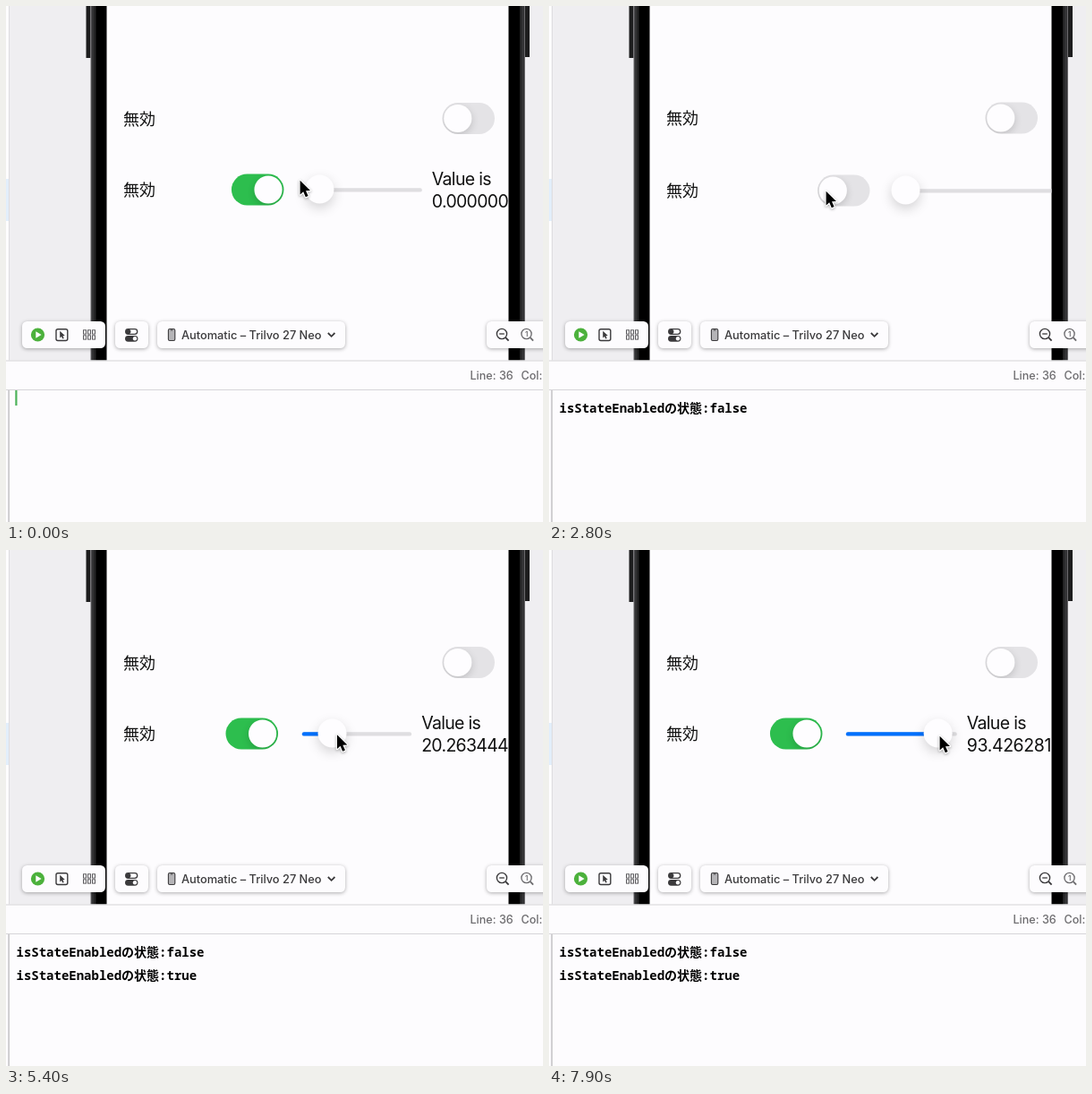
Recreate the animation shown at these times as an HTML page with a canvas. Size 600x576 px, loop 8000 ms.

```html
<!DOCTYPE html>
<html lang="ja">
<head>
<meta charset="utf-8">
<title>Toggle and slider preview</title>
<style>
  html, body { margin: 0; width: 600px; height: 576px; overflow: hidden; background: #fdfcfe; }
  canvas { display: block; }
</style>
</head>
<body>
<canvas id="stage" width="600" height="576"></canvas>
<script>
const ctx = document.getElementById('stage').getContext('2d');
const LOOP = 8000, STEP = 100;
const OFF_AT = 800, ON_AT = 3000, SLIDE = 450;
const SCREEN = '#fdfcfe', GREY = [228, 227, 230], GREEN = [45, 190, 78], BLUE = '#0070fd', INK = '#3b3a3c';
const UI = 'Inter, Roboto, sans-serif';
const CJK = '"Noto Sans CJK JP", "Noto Sans CJK", sans-serif';
const MONO = '"Noto Sans Mono", "Noto Sans CJK JP", "Noto Sans CJK", monospace';

// Each key: time, x, y
const pointer = [
  [0, 328, 194], [100, 324, 194], [200, 324, 194], [700, 282, 209], [1100, 282, 210],
  [1500, 282, 210], [2200, 309, 206], [3100, 309, 206], [3600, 362, 205],
  [3900, 352, 205], [4700, 353, 205], [6200, 388, 206], [7100, 420, 207], [7900, 436, 207]
];
// Each key: time, slider value
const values = [[3800, 0], [4700, 1.305965], [6200, 41.929135], [7100, 71.960783], [7900, 93.426281]];

function at(keys, t, i) {
  if (t <= keys[0][0]) return keys[0][i];
  for (let k = 1; k < keys.length; k++) {
    const a = keys[k - 1], b = keys[k];
    if (t === b[0]) return b[i];
    if (t < b[0]) return a[i] + (b[i] - a[i]) * (t - a[0]) / (b[0] - a[0]);
  }
  return keys[keys.length - 1][i];
}

const easeOut = p => 1 - Math.pow(1 - Math.min(1, Math.max(0, p)), 3);

function box(x, y, w, h, fill) {
  ctx.fillStyle = fill;
  ctx.fillRect(x, y, w, h);
}

function round(x, y, w, h, r) {
  ctx.beginPath();
  ctx.roundRect(x, y, w, h, r);
}

function disc(x, y, r, fill) {
  ctx.fillStyle = fill;
  ctx.beginPath();
  ctx.arc(x, y, r, 0, Math.PI * 2);
  ctx.fill();
}

function path(points, close) {
  ctx.beginPath();
  points.forEach(([x, y]) => ctx.lineTo(x, y));
  if (close) ctx.closePath();
}

function pen(color, width) {
  ctx.strokeStyle = color;
  ctx.lineWidth = width;
}

function label(str, x, y, font, color, spacing = 0) {
  ctx.font = font;
  ctx.letterSpacing = spacing + 'px';
  ctx.fillStyle = color;
  ctx.fillText(str, x, y);
}

function shadowed(alpha, blur, dy, draw) {
  ctx.save();
  ctx.shadowColor = `rgba(0,0,0,${alpha})`;
  ctx.shadowBlur = blur;
  ctx.shadowOffsetY = dy;
  draw();
  ctx.restore();
}

function toggle(x, cy, on) {
  const c = GREY.map((g, i) => Math.round(g + (GREEN[i] - g) * on));
  ctx.save();
  round(x, cy - 17.5, 58.5, 35, 17.5);
  ctx.fillStyle = `rgb(${c})`;
  ctx.fill();
  ctx.clip();
  shadowed(0.16, 8, 3, () => disc(x + 17.3 + 23.8 * on, cy, 15.6, '#fefdff'));
  ctx.restore();
}

function slider(x, end, cy, value) {
  const knob = x + 15 + (end - x - 30) * value / 100;
  round(x, cy - 1.8, end - x, 4.4, 2.2);
  ctx.fillStyle = '#dfdee1';
  ctx.fill();
  if (value > 0) {
    round(x, cy - 1.8, knob - x, 4.4, 2.2);
    ctx.fillStyle = BLUE;
    ctx.fill();
  }
  shadowed(0.17, 13, 5, () => disc(knob, cy - 0.5, 16, '#fefdff'));
}

function phone() {
  box(0, 0, 600, 396, '#efeef1');
  box(0, 0, 3, 396, SCREEN);
  box(0, 193, 3, 47, '#e2eefb');
  box(3, 0, 1, 396, '#dddcdf');
  box(89.5, 0, 5, 58, '#1d1d1e');
  box(580, 0, 5, 57, '#1d1d1e');
  box(94.5, 0, 485.5, 396, '#6a696c');
  box(95.5, 0, 483.5, 396, '#333335');
  box(98, 0, 478, 396, '#242425');
  box(100.5, 0, 473.5, 396, '#000');
  box(112.5, 0, 449, 396, SCREEN);
}

function panel(x, w) {
  round(x, 352, w, 30, 5.5);
  ctx.fillStyle = SCREEN;
  shadowed(0.32, 4, 1, () => ctx.fill());
}

function lens(x, color) {
  pen(color, 1.4);
  ctx.beginPath();
  ctx.arc(x, 366, 5.6, 0, Math.PI * 2);
  ctx.stroke();
  pen(color, 1.9);
  path([[x + 4.2, 370.2], [x + 7.6, 373.6]]);
  ctx.stroke();
}

function toolbar() {
  panel(18, 93);
  panel(122, 37);
  panel(169, 210);
  panel(537, 80);

  disc(35.5, 367, 7.6, '#4cb13c');
  path([[33.3, 363.2], [33.3, 370.8], [39.6, 367]], true);
  ctx.fillStyle = '#fff';
  ctx.fill();

  pen(INK, 1.4);
  round(56, 360.7, 12.8, 12.8, 2);
  ctx.stroke();
  path([[60.2, 362.8], [60.2, 370.4], [62, 368.9], [63.3, 371.6], [64.7, 371], [63.5, 368.3], [65.8, 368.1]], true);
  ctx.fillStyle = INK;
  ctx.fill();

  pen('#5c5b5e', 1);
  for (let i = 0; i < 6; i++) {
    ctx.strokeRect(86.5 + (i % 3) * 5, 361.8 + Math.floor(i / 3) * 6, 3, 4.3);
  }

  pen(INK, 1.3);
  round(133.7, 360.7, 13, 5.6, 2.8);
  ctx.stroke();
  disc(136.6, 363.5, 2.8, INK);
  round(133, 367.9, 14.4, 6.8, 3.4);
  ctx.fillStyle = INK;
  ctx.fill();
  disc(144, 371.3, 2.2, SCREEN);

  round(181.4, 360.5, 7.4, 13, 1.6);
  ctx.fillStyle = '#b5b4b7';
  ctx.fill();
  pen(INK, 1.1);
  ctx.stroke();
  box(183.8, 361.4, 2.6, 1, INK);
  label('Automatic – Trilvo 27 Neo', 196, 371.5, '500 12.8px ' + UI, INK);
  pen(INK, 1.8);
  path([[359.8, 365], [363.6, 368.8], [367.4, 365]]);
  ctx.stroke();

  lens(554, INK);
  pen(INK, 1.3);
  path([[551.2, 366], [556.8, 366]]);
  ctx.stroke();
  lens(581.5, '#6e6d70');
  label('1', 579.9, 369, '600 8px ' + UI, '#6e6d70');
}

function consolePane(t) {
  box(0, 395.5, 600, 181, SCREEN);
  box(0, 395.5, 600, 1, '#d6d5d8');
  box(0, 428, 600, 1, '#d6d5d8');
  box(2.5, 429, 1.2, 147, '#b3b2b5');
  const font = '500 12.6px ' + UI;
  label('Line: 36', 518.5, 416.5, font, '#6d6c6f');
  label('Col:', 575.5, 416.5, font, '#6d6c6f');
  if (t < OFF_AT) box(10.3, 429, 2.2, 17, '#4db35a');
  const log = (state, y) => label('isStateEnabledの状態:' + state, 11.5, y, '600 14px ' + MONO, '#000');
  if (t >= OFF_AT) log('false', 454);
  if (t >= ON_AT) log('true', 480);
}

function controls(t) {
  const enabled = t < OFF_AT || t >= ON_AT;
  const on = t < ON_AT ? 1 - easeOut((t - OFF_AT) / SLIDE) : easeOut((t - ON_AT) / SLIDE);
  const top = enabled ? 125.5 : 125, row = enabled ? 205 : 206;
  const font = '18px ' + CJK;
  label('無効', 131, top + 7, font, '#111');
  label('無効', 131, row + 7, font, '#111');
  toggle(487.5, top, 0);

  ctx.save();
  ctx.beginPath();
  ctx.rect(112.5, 0, 449, 396);
  ctx.clip();
  if (enabled) {
    const value = at(values, t, 1), str = value.toFixed(6);
    const big = '19.5px ' + UI, tight = -0.7;
    // Narrow ones get a little more air
    const loose = tight + 0.3 * (str.split('1').length - 1);
    ctx.font = big;
    ctx.letterSpacing = loose + 'px';
    const x = 561 - ctx.measureText(str).width, shift = x - 476;
    toggle(252 + shift * 0.55, row, on);
    slider(335.5 + shift * 0.4, x - 11, row, value);
    label('Value is', x, 199.5, big, '#111', tight);
    label(str, x, 225, big, '#111', loose);
  } else {
    toggle(300, row, on);
    slider(383.5, 620, row, 0);
  }
  ctx.restore();
  ctx.letterSpacing = '0px';
}

function arrow(x, y) {
  ctx.save();
  ctx.translate(x, y);
  path([[0.6, 0.8], [0.6, 16.6], [4.2, 13.3], [6.8, 19.3], [9.6, 18.1], [7, 12.3], [12, 12.1]], true);
  ctx.lineJoin = 'round';
  pen('#fff', 2.4);
  shadowed(0.3, 3, 1, () => ctx.stroke());
  ctx.fillStyle = '#000';
  ctx.fill();
  ctx.restore();
}

function draw(now) {
  const t = Math.floor((now % LOOP) / STEP) * STEP;
  phone();
  controls(t);
  toolbar();
  consolePane(t);
  arrow(at(pointer, t, 1), at(pointer, t, 2));
}

let start = null;
function tick(now) {
  if (start === null) start = now;
  draw(now - start);
  requestAnimationFrame(tick);
}
draw(0);
requestAnimationFrame(tick);
</script>
</body>
</html>
```
